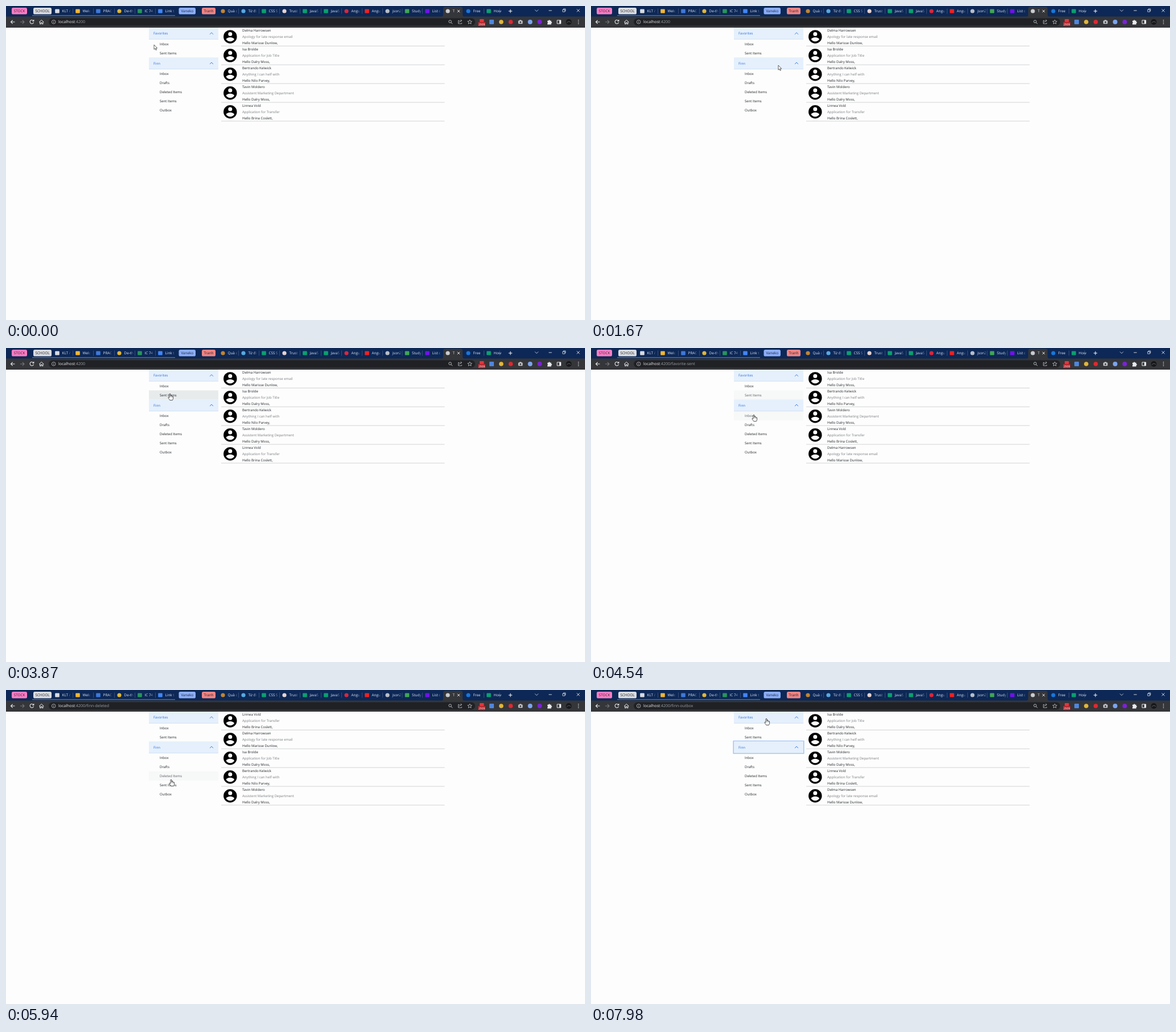
These frames come from a looping animation (1017 px wide and 551 px high, 8 s). An HTML page:

```html
<!DOCTYPE html>
<html lang="en">
<head>
<meta charset="utf-8">
<title>Mail list</title>
<style>
  html, body { margin: 0; width: 100%; height: 100%; overflow: hidden; background: #fdfdfd; }
  svg { display: block; width: 100%; height: 100%; }
  text {
    font-family: "Open Sans", "Noto Sans", sans-serif;
    font-size: 6.03px;
    text-rendering: geometricPrecision;
    white-space: pre;
  }
</style>
</head>
<body>
<svg id="stage" viewBox="0 0 1017 551">
  <defs>
    <linearGradient id="fade">
      <stop offset=".65" stop-color="#e4eaf5"/>
      <stop offset="1" stop-color="#e4eaf5" stop-opacity=".15"/>
    </linearGradient>
    <clipPath id="panelClip"><rect id="panelBox" x="245" y="111" width="135" height="80"/></clipPath>
  </defs>
</svg>
<script>
const LOOP = 8000;
const stage = document.getElementById('stage');
const panelBox = document.getElementById('panelBox');

function add(tag, attrs, parent = stage) {
  const node = document.createElementNS('http://www.w3.org/2000/svg', tag);
  set(node, attrs);
  parent.append(node);
  return node;
}
function set(node, attrs) {
  for (const key in attrs) node.setAttribute(key, attrs[key]);
}
const rect = (x, y, width, height, fill, rx = 0, parent) =>
  add('rect', { x, y, width, height, fill, rx }, parent);
const dot = (cx, cy, r, fill) => add('circle', { cx, cy, r, fill });
const line = (d, stroke = '#e8eaed', width = 1, parent) =>
  add('path', { d, stroke, fill: 'none', 'stroke-width': width }, parent);
function label(x, y, content, fill, size, parent) {
  const node = add('text', { x, y, fill }, parent);
  if (size) node.style.fontSize = size + 'px';
  node.textContent = content;
  return node;
}

// ---- Browser tab strip ----
rect(0, 0, 1017, 19, '#0d2856');
line('M46 16.8H297', '#aab4c6', .7);

function chip(x, width, name, fill) {
  rect(x, 3, width, 11.6, fill, 2.6);
  label(x + width / 2, 11, name, '#20242c', 6.3).setAttribute('text-anchor', 'middle');
}
chip(10, 27, 'STOCK', '#ff7cc4');
chip(48, 32, 'SCHOOL', '#dadce0');
chip(303.5, 29.5, 'Vaneko', '#8caefa');
chip(344, 24, 'Tranh', '#f08484');

// [icon centre, title, icon colour, round]
const tabs = [
  [90, 'KLT /', '#d8dce2'], [126, 'Welc', '#f2b632'], [162, 'PRAC', '#3f78d8'],
  [199, 'De-th', '#e0b63a', 1], [235, 'IC 74', '#27955a'], [271, 'Link t', '#4285f4'],
  [381, 'Quà c', '#c18432', 1], [417, 'Từ đi', '#58a8e0', 1], [453, 'CSS S', '#0aa06e'],
  [489, 'Trust', '#e6d2cf', 1], [525, 'JavaS', '#0aa06e'], [562, 'JavaS', '#0aa06e'],
  [598, 'Angu', '#d9263c', 1], [634, 'Angu', '#f02020'], [670, 'json2', '#b8bec8', 1],
  [704.5, 'Study', '#3fa653'], [740, 'List c', '#7012e8'], [776, 'T', '#c8cbd0', 1],
  [812, 'Free', '#1976d8', 1], [848, 'How', '#0aa06e']
];
add('path', { d: 'M764 19Q768 19 768 15V5Q768 1.5 771 1.5H799Q802 1.5 802 5V15Q802 19 806 19Z', fill: '#35363a' });
for (const [x, title, color, round] of tabs) {
  if (round) dot(x, 9, 3.6, color);
  else rect(x - 3.8, 5.6, 7.6, 6.8, color, 1);
  const plain = ['T', 'Free', 'How'].includes(title);
  label(x + 8.6, 11.2, title, plain ? '#e4eaf5' : 'url(#fade)', 6.3);
  if (x !== 776 && x !== 812 && x !== 90 && x !== 381) line(`M${x - 8.5} 4.5V13.5`, '#53688f', .6);
}
line('M792.8 6.8l4.4 4.4m0-4.4l-4.4 4.4', '#f0f0f0', .9);
line('M867 4.5V13.5', '#53688f', .6);
line('M882.8 9h6.4M886 5.8v6.4', '#fff', 1);
line('M929 6.5l3 3 3-3', '#dfe5f0', .8);
line('M953.3 8h5.4', '#fff', .8);
line('M977.8 6.4h3.8v3.8h-3.8zM979 6.2v-1.2h3.8v3.8h-1', '#fff', .7);
line('M1002.6 5.4l5 5m0-5l-5 5', '#fff', .8);

// ---- Toolbar ----
rect(0, 18.5, 1017, 19.5, '#35363a');
rect(75, 21.5, 749, 13, '#202124', 6.5);
line('M15.5 28H8.5m3.2-3.2L8.5 28l3.2 3.2', '#e8eaed', 1.1);
line('M25 28h7m-3.2-3.2L32 28l-3.2 3.2', '#75777b', 1.1);
line('M48 25.7a3.3 3.3 0 1 0 .6 2.9M48.8 24v2.5h-2.5', '#e8eaed', 1.1);
line('M58.2 28.4L62.3 24.5l4.1 3.9M59.6 27.5v4.1h1.8v-2.6h1.8v2.6h1.8v-4.1', '#e8eaed', 1);
add('circle', { cx: 83.7, cy: 27.9, r: 3.3, fill: 'none', stroke: '#c4c7cb', 'stroke-width': .8 });
line('M83.7 27.4v2.4M83.7 25.8v.9', '#c4c7cb', .8);
const url = label(92, 30.3, '', '#9aa0a6', 6.97);
const host = add('tspan', { fill: '#f0f1f3' }, url);
const path = add('tspan', {}, url);
host.textContent = 'localhost';

add('circle', { cx: 780, cy: 27.2, r: 2.3, fill: 'none', stroke: '#c4c7cb', 'stroke-width': .9 });
line('M781.8 29l2.4 2.4', '#c4c7cb', 1);
line('M796.5 25.5h-2v5.5h6v-1.5M796.2 29q.3-3.2 4-3.4m-1.6-1.8l2 1.8-2 1.8', '#c4c7cb', .8);
line('M814.6 24.2l1.1 2.5 2.7.2-2.1 1.8.7 2.7-2.4-1.5-2.4 1.5.7-2.7-2.1-1.8 2.7-.2z', '#c4c7cb', .8);
rect(832, 23, 7.5, 5, '#e4363d', 1);
rect(829.5, 28, 12.5, 7.2, '#b3262e', 1.2);
label(835.7, 34, '2909', '#fff', 5).setAttribute('text-anchor', 'middle');
rect(849, 24, 8, 8, '#4f86dc', 1);
dot(869.8, 28, 3.8, '#e0b63a');
dot(886.5, 28, 3.8, '#e02832');
rect(899.8, 25.5, 7.6, 5.8, '#c4c7cb', 1);
rect(902, 24.5, 3.2, 1.5, '#c4c7cb');
dot(903.6, 28.4, 1.6, '#4a4c50');
dot(920.6, 28, 4, '#7ba4ee');
dot(937.4, 28, 4, '#7a22d6');
add('path', { d: 'M951 25.8h2a1.3 1.3 0 1 1 2.6 0h2v2a1.3 1.3 0 1 1 0 2.6v2h-6.6v-2.2a1.2 1.2 0 0 0 0-2.3z', fill: '#e8eaed' });
line('M968 25h6.6v6h-6.6z', '#e8eaed', 1);
rect(971.8, 25, 3, 6, '#e8eaed');
dot(988.5, 28, 5, '#17181a');
line('M985 29.5q3.5-4 7-.6', '#5c6064', 1);
for (const y of [25, 28, 31]) dot(1005.5, y, .8, '#e8eaed');

// ---- Message list ----
const mails = [
  ['Delma Harrowsen', 'Apology for late response email', 'Marisse Dunlow'],
  ['Isa Brolde', 'Application for Job Title', 'Dalry Moss'],
  ['Bertrando Kelwick', 'Anything I can helf with', 'Nilo Parvey'],
  ['Tavin Moldero', 'Assistent Marketing Department', 'Dalry Moss'],
  ['Linnea Vold', 'Application for Transfer', 'Brina Coslett']
];
const AVATAR = 'M12 2a10 10 0 1 0 0 20a10 10 0 1 0 0-20zm0 3a3 3 0 1 1 0 6a3 3 0 1 1 0-6z' +
  'm0 14.2c-2.5 0-4.7-1.3-6-3.2 0-2 4-3.1 6-3.1s6 1.1 6 3.1c-1.3 1.9-3.5 3.2-6 3.2z';
const rows = mails.map((_, i) => {
  const y = i * 32.95;
  add('path', { d: AVATAR, 'fill-rule': 'evenodd', transform: `translate(379.7 ${39.8 + y}) scale(1.175)` });
  line(`M378 ${70.2 + y}H770.5`, '#c6c8ca', .8);
  return [
    label(415, 45.1 + y, '', '#212529'),
    label(415, 55.9 + y, '', '#7a7d80'),
    label(415, 66.8 + y, '', '#212529')
  ];
});

// ---- Sidebar ----
const panel = add('g', { 'clip-path': 'url(#panelClip)' });
function makeItem(y, name, parent) {
  const back = rect(251, y, 122, 16, '#f7f8f8', 0, parent);
  return { y, back, text: label(270, y + 10.2, name, '#212529', 0, parent) };
}
const items = [
  makeItem(58.8, 'Inbox'), makeItem(74.4, 'Sent Items'),
  ...['Inbox', 'Drafts', 'Deleted Items', 'Sent Items', 'Outbox']
    .map((name, i) => makeItem(110.8 + i * 16, name, panel))
];
function makeHeader(y, height, name) {
  const ring = add('rect', { x: 250.3, y: y - .7, width: 123.4, height: height + 1.4, fill: 'none', stroke: '#a5c6f8', 'stroke-width': 1.7 });
  const back = rect(251, y, 122, height, '#e5f0fc');
  const rule = line(`M251 ${y + height}H373`, '#c6d9ee', .7);
  const text = label(259, y + height / 2 + 2.2, name, '#2f6fe0');
  const arrow = line('M-3 1.6L0-1.5 3 1.6', '#2f6fe0', .9);
  return { y: y + height / 2, ring, back, rule, text, arrow };
}
const favorites = makeHeader(38, 20.3, 'Favorites');
const account = makeHeader(90.3, 20.3, 'Finn');
set(favorites.ring, { visibility: 'hidden' });
set(favorites.arrow, { transform: `translate(361 ${favorites.y})` });

// ---- Pointer ----
const arrowCursor = add('path', {
  d: 'M0 0V8.2L1.9 6.5 3.2 9.4 4.5 8.8 3.2 6H5.7Z',
  fill: '#fff', stroke: '#222', 'stroke-width': .7
});
const handCursor = add('g', {});
add('path', {
  d: 'M-1 .8Q0-.5 1 .8V4.2Q2-.0 2.8 4.4 3.8 3.6 4.3 4.8 5.6 4.2 5.6 6V8.2Q5.4 10 4.4 11.6H-.2Q-1.4 9.6-3 7.6-3.4 6.2-2.2 6.3L-1 7.2Z',
  fill: '#fff', stroke: '#222', 'stroke-width': .75
}, handCursor);
line('M1 4v2.4M2.8 4.6v2M4.3 5v1.7', '#333', .5, handCursor);

// ---- Motion ----
// [time, x, y] of the pointer tip
const track = [
  [0, 260, 68], [500, 264, 74], [1300, 322, 102], [1670, 329, 104], [2150, 334, 300],
  [2450, 330, 300], [3100, 296, 100], [3650, 288, 80], [4000, 288, 80], [4500, 286, 117],
  [4950, 286, 119], [5180, 287, 134], [5400, 288, 136], [5650, 289, 150], [5800, 289, 151],
  [5940, 290, 157], [6100, 290, 166], [6280, 290, 167], [6430, 291, 182], [6600, 291, 183],
  [7040, 310, 87], [7220, 311, 100], [7740, 311, 99], [7980, 308, 50], [8000, 308, 50]
];
// [time, item index, route, list rotation]
const clicks = [
  [3900, 1, '/favorite-sent', 1], [4800, 2, '/finn-inbox', 2], [5360, 3, '/finn-drafts', 3],
  [5760, 4, '/finn-deleted', 4], [6220, 5, '/finn-sent', 0], [6530, 6, '/finn-outbox', 1]
];
const PRESS = 80, FOLD = 7300, UNFOLD = 7730, SLIDE = 350, HOVER_FROM = 2600;

const clamp = v => Math.min(1, Math.max(0, v));
const smooth = v => v * v * (3 - 2 * v);
// cubic-bezier(.25, .1, .25, 1), solved by bisection
function ease(x) {
  const bezier = (a, b, s) => 3 * a * s * (1 - s) ** 2 + 3 * b * s * s * (1 - s) + s ** 3;
  let low = 0, high = 1;
  for (let i = 0; i < 20; i++) {
    const mid = (low + high) / 2;
    if (bezier(.25, .25, mid) < x) low = mid; else high = mid;
  }
  return bezier(.1, 1, low);
}
function pointerAt(t) {
  const i = track.findIndex(k => k[0] > t);
  const [t0, x0, y0] = track[i - 1], [t1, x1, y1] = track[i];
  const s = smooth((t - t0) / (t1 - t0));
  return [x0 + (x1 - x0) * s, y0 + (y1 - y0) * s];
}
function mix(a, b, s) {
  return `rgb(${a.map((v, i) => Math.round(v + (b[i] - v) * s))})`;
}

function update(t) {
  const [x, y] = pointerAt(t);
  const inside = t > HOVER_FROM && x > 251 && x < 373 && y > 38 && y < 191;
  const place = `translate(${x.toFixed(2)} ${y.toFixed(2)})`;
  set(arrowCursor, { transform: place, visibility: inside ? 'hidden' : 'visible' });
  set(handCursor, { transform: place, visibility: inside ? 'visible' : 'hidden' });

  const last = clicks.filter(c => c[0] <= t).pop();
  path.textContent = ':4200' + (last ? last[2] : '');
  const shift = last ? last[3] : 0;
  rows.forEach((texts, i) => {
    const [from, subject, to] = mails[(i + shift) % mails.length];
    [from, subject, `Hello ${to},`].forEach((s, j) => { texts[j].textContent = s; });
  });

  const pressed = clicks.find(c => t >= c[0] - PRESS && t < c[0]);
  const focused = t >= FOLD - PRESS ? -1 : pressed ? pressed[1] : last ? last[1] : -1;
  items.forEach((item, i) => {
    const down = pressed && pressed[1] === i;
    const lit = focused === i || (inside && y >= item.y && y < item.y + 16);
    set(item.back, { fill: down ? '#e8ebec' : '#f7f8f8', visibility: lit ? 'visible' : 'hidden' });
    set(item.text, { fill: lit && !down ? '#5a6066' : '#212529' });
  });

  const since = (from, span) => clamp((t - from) / span);
  const open = 1 - ease(since(FOLD, SLIDE)) + ease(since(UNFOLD, SLIDE));
  const tint = 1 - since(FOLD, 150) + since(UNFOLD, 150);
  const turn = 1 - ease(since(FOLD, 200)) + ease(since(UNFOLD, 200));
  const ink = mix([33, 37, 41], [47, 111, 224], tint);
  set(panelBox, { height: (80.2 * open).toFixed(2) });
  set(account.ring, { visibility: t >= FOLD - PRESS ? 'visible' : 'hidden' });
  set(account.back, { fill: mix([253, 253, 253], [229, 240, 252], tint) });
  set(account.text, { fill: ink });
  set(account.arrow, { stroke: ink, transform: `translate(361 ${account.y}) rotate(${(180 * (1 - turn)).toFixed(1)})` });
}

function tick() {
  update(performance.now() % LOOP);
  requestAnimationFrame(tick);
}
tick();
</script>
</body>
</html>
```
